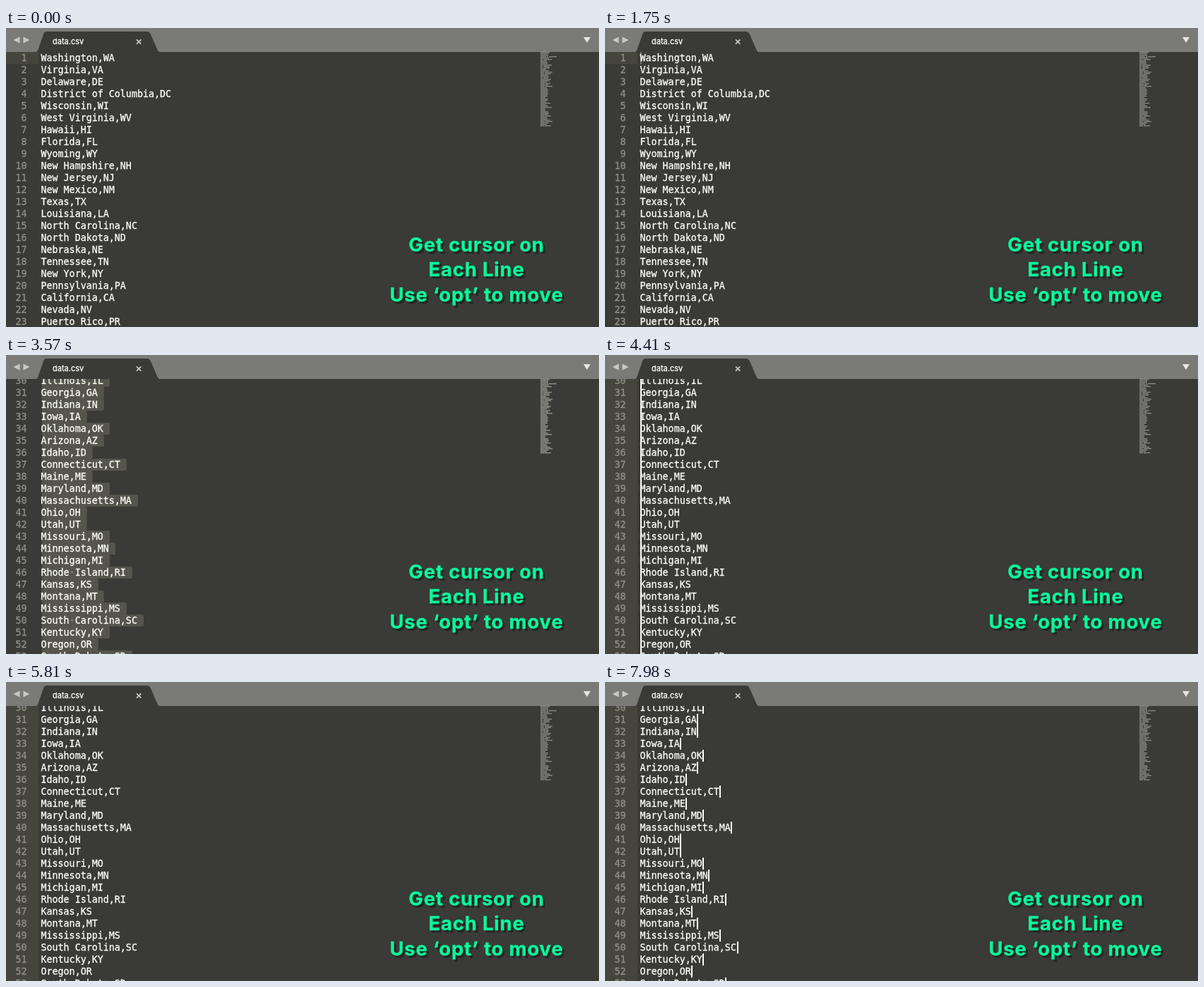
Recreate the animation shown at these times as an HTML page with a canvas. Size 840x424 px, loop 8 s.

```html
<!DOCTYPE html>
<html lang="en">
<head>
<meta charset="utf-8">
<title>Multiple cursors</title>
<style>
  html, body { margin: 0; width: 100%; height: 100%; overflow: hidden; background: #3a3a36; }
  canvas { display: block; width: 840px; height: 424px; }
</style>
</head>
<body>
<canvas id="stage"></canvas>
<script>
const WIDTH = 840, HEIGHT = 424, LOOP = 8000;
const BAR = 34, ROW = 17, TEXT_X = 50, CHAR = 8.03, SCROLL_END = 499;
const MONO = '13.33px "DejaVu Sans Mono", monospace';
const COLOR = {
  page: '#3a3a36', bar: '#7a7b77', gutter: '#45453d', selection: '#55554d',
  text: '#fdfdf9', number: '#90918b', icon: '#c9cac6', map: '#8b8b85',
  caption: '#08f99b', shadow: '#242622'
};

const LINES = `Washington,WA|Virginia,VA|Delaware,DE|District of Columbia,DC
Wisconsin,WI|West Virginia,WV|Hawaii,HI|Florida,FL|Wyoming,WY|New Hampshire,NH
New Jersey,NJ|New Mexico,NM|Texas,TX|Louisiana,LA|North Carolina,NC
North Dakota,ND|Nebraska,NE|Tennessee,TN|New York,NY|Pennsylvania,PA
California,CA|Nevada,NV|Puerto Rico,PR|Colorado,CO|Virgin Islands,VI
Alaska,AK|Alabama,AL|Arkansas,AR|Vermont,VT|Illinois,IL|Georgia,GA
Indiana,IN|Iowa,IA|Oklahoma,OK|Arizona,AZ|Idaho,ID|Connecticut,CT|Maine,ME
Maryland,MD|Massachusetts,MA|Ohio,OH|Utah,UT|Missouri,MO|Minnesota,MN
Michigan,MI|Rhode Island,RI|Kansas,KS|Montana,MT|Mississippi,MS
South Carolina,SC|Kentucky,KY|Oregon,OR|South Dakota,SD`.split(/[|\n]/);

// Editor state from each time on; blink is the time at which a caret cycle begins.
const STEPS = [
  { at: 0, mode: 'single', blink: 300 },
  { at: 2940, mode: 'all' },
  { at: 3850, mode: 'split', blink: 3850 },
  { at: 4170, mode: 'start', blink: 4170 },
  { at: 6750, mode: 'end', blink: 6750 }
];

const canvas = document.getElementById('stage');
const ctx = canvas.getContext('2d');
const ratio = window.devicePixelRatio || 1;
canvas.width = WIDTH * ratio;
canvas.height = HEIGHT * ratio;

function rect(x, y, w, h, color) {
  ctx.fillStyle = color;
  ctx.fillRect(x, y, w, h);
}

function polygon(color, ...points) {
  ctx.fillStyle = color;
  ctx.beginPath();
  points.forEach(([x, y]) => ctx.lineTo(x, y));
  ctx.fill();
}

// A thin outline in the same colour gives the heavier smoothing of the editor's text.
function text(value, x, y, color, font, align = 'left', outline = 0.3) {
  ctx.font = font;
  ctx.textAlign = align;
  ctx.fillStyle = ctx.strokeStyle = color;
  ctx.lineWidth = outline;
  ctx.fillText(value, x, y);
  ctx.strokeText(value, x, y);
}

function scrollAt(time) {
  const p = Math.min(1, Math.max(0, (time - 2940) / 210));
  return Math.round(SCROLL_END * (1 - (1 - p) ** 3));
}

function caretAlpha(step, time) {
  if (step.blink === undefined) return 0;
  const phase = (time - step.blink + LOOP) % 1000;
  const fadeOut = (500 - phase) / 150;
  const fadeIn = (phase - 900) / 100;
  return Math.min(1, Math.max(0, fadeOut, fadeIn));
}

function drawRow(line, index, top, step, caret) {
  const { mode } = step;
  const selected = mode === 'all' || mode === 'split';
  const multi = mode === 'split' || mode === 'start' || mode === 'end';
  const end = line.length * CHAR;
  const baseline = top + 13;

  if (multi || (mode === 'single' && index === 0)) rect(0, top, 46, ROW, COLOR.gutter);
  if (selected) {
    ctx.fillStyle = COLOR.selection;
    ctx.beginPath();
    ctx.roundRect(TEXT_X + 1, top, end + (mode === 'all' ? 7.5 : 0), ROW, [0, 2, 2, 0]);
    ctx.fill();
  }

  text(index + 1, 29.5, baseline, COLOR.number, MONO, 'right');
  text(line, TEXT_X - 0.5, baseline, COLOR.text, MONO);
  if (selected) {
    const dots = line.replace(/./g, c => c === ' ' ? '·' : ' ');
    text(dots, TEXT_X - 0.5, baseline, COLOR.number, MONO);
  }

  if (caret > 0 && (multi || index === 0)) {
    const atEnd = mode === 'split' || mode === 'end';
    ctx.globalAlpha = caret;
    rect(TEXT_X + (atEnd ? Math.round(end) : 0), top, 2, ROW, COLOR.text);
    ctx.globalAlpha = 1;
  }
}

function drawMinimap(selected) {
  LINES.forEach((line, i) => {
    const y = BAR + i * 2;
    if (selected) rect(757, y, line.length, 2, COLOR.selection);
    for (const word of line.matchAll(/\S+/g)) {
      rect(757 + word.index, y, word[0].length, 1.3, COLOR.map);
    }
  });
}

function drawBar() {
  rect(0, 0, WIDTH, BAR, COLOR.bar);
  ctx.fillStyle = COLOR.page;
  ctx.beginPath();
  ctx.moveTo(43, 34);
  ctx.lineTo(45, 32);
  ctx.lineTo(53, 9);
  ctx.quadraticCurveTo(54, 5, 58, 5);
  ctx.lineTo(200, 5);
  ctx.quadraticCurveTo(203, 5, 205, 9);
  ctx.lineTo(215, 32);
  ctx.lineTo(217, 34);
  ctx.fill();

  polygon(COLOR.icon, [10.5, 17], [19.5, 12.5], [19.5, 21.5]);
  polygon(COLOR.icon, [33.5, 17], [24.5, 12.5], [24.5, 21.5]);
  polygon('#e6e7e3', [818, 13], [828, 13], [823, 21]);
  text('data.csv', 66, 23, COLOR.text, '11px Inter, sans-serif');

  ctx.strokeStyle = COLOR.icon;
  ctx.lineWidth = 1.7;
  ctx.beginPath();
  ctx.moveTo(185, 16.3);
  ctx.lineTo(191.4, 22.7);
  ctx.moveTo(191.4, 16.3);
  ctx.lineTo(185, 22.7);
  ctx.stroke();
}

function drawCaption() {
  const font = '700 27.5px Inter, sans-serif';
  const rows = [['Get cursor on', 317], ['Each Line', 352], ['Use ‘opt’ to move', 388]];
  ctx.letterSpacing = '0.8px';
  for (const [offset, color] of [[3, COLOR.shadow], [0, COLOR.caption]]) {
    rows.forEach(([value, y]) => text(value, 666.5 + offset, y + offset, color, font, 'center'));
  }
  ctx.letterSpacing = '0px';
}

function draw(time) {
  const step = STEPS.findLast(s => s.at <= time);
  const scroll = scrollAt(time);
  const caret = caretAlpha(step, time);

  ctx.setTransform(ratio, 0, 0, ratio, 0, 0);
  rect(0, 0, WIDTH, HEIGHT, COLOR.page);
  LINES.forEach((line, i) => {
    const top = BAR + i * ROW - scroll;
    if (top > 0 && top < HEIGHT) drawRow(line, i, top, step, caret);
  });
  drawMinimap(step.mode === 'all' || step.mode === 'split');
  drawBar();
  drawCaption();
}

const begin = performance.now();
function tick() {
  draw((performance.now() - begin) % LOOP);
  requestAnimationFrame(tick);
}
tick();
</script>
</body>
</html>
```
